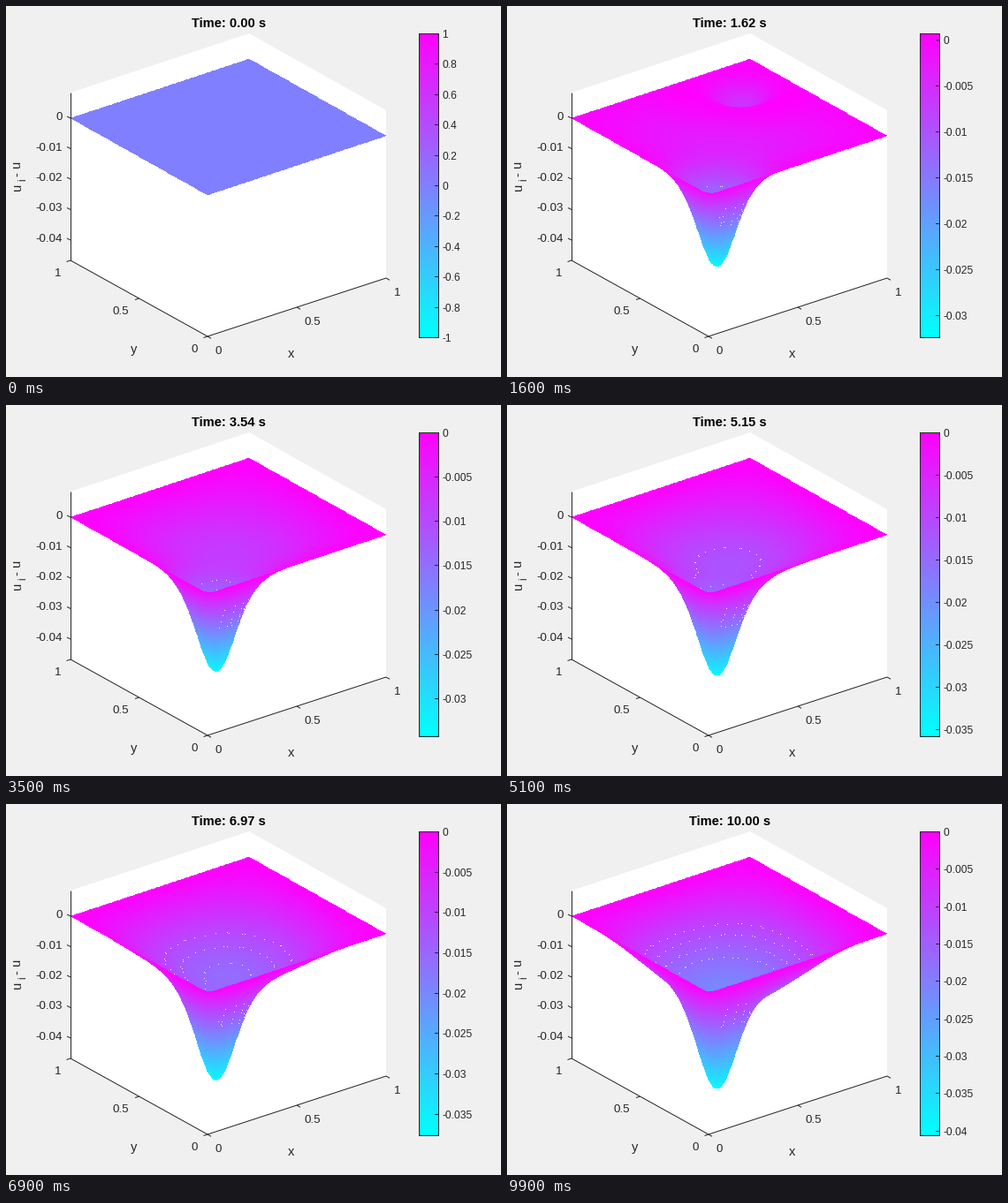
These frames come from a looping animation (560 by 420 pixels, 10000 ms). A matplotlib script:

```python
import numpy as np
import matplotlib.pyplot as plt
from matplotlib.animation import FuncAnimation

W, H, DPI = 560, 420, 100
FRAMES, INTERVAL = 100, 100
DARK = "#262626"
ORIGIN = np.array([228, 214])
EX, EY, EZ = np.array([202, -67]), np.array([-155, -87]), 3450
Z_LOW, Z_HIGH = -0.0465, 0.0084
N, LINE_STEP = 160, 8

fig = plt.figure(figsize=(W / DPI, H / DPI), dpi=DPI, facecolor="#f0f0f0")
ax = fig.add_axes([0, 0, 1, 1])
ax.set_xlim(0, W)
ax.set_ylim(H, 0)
ax.axis("off")

# descending coordinates, so that cells are painted from back to front
side = np.linspace(1, 0, N + 1)
gx, gy = np.meshgrid(side, side)


def project(x, y, z):
    px = ORIGIN[0] + EX[0] * x + EY[0] * y
    py = ORIGIN[1] + EX[1] * x + EY[1] * y - EZ * z
    return px, py


def well(x, y, var):
    """Gaussian at (0.2, 0.2) that vanishes on the near edges."""
    def part(s):
        return np.exp(-(s - 0.2) ** 2 / (2 * var)) - np.exp(-(s + 0.2) ** 2 / (2 * var))
    return part(x) * part(y)


def depth(x, y, t):
    pull = 0.031 * (1 - np.exp(-1.2 * t) * np.cos(4.85 * t))
    d = pull * (0.55 * well(x, y, 0.005) + 0.45 * well(x, y, 0.0135))
    d = d + 0.00225 * t * np.sin(np.pi * x ** 0.93) * np.sin(np.pi * y ** 0.93)
    # short-lived ripple near the far corner
    q = ((x - 0.8) ** 2 + (y - 0.8) ** 2) / 0.15 ** 2
    window = (1 - (2 * x - 1) ** 4) * (1 - (2 * y - 1) ** 4)
    swing = -0.0113 * t * np.exp(-(t / 1.6) ** 2) * np.sin(np.pi * t / 1.15)
    return d + swing * window * (1 - q) * np.exp(-q / 2)


def speckles(d, t):
    """Bright pixels where mesh lines cross a few depth levels."""
    band = np.clip(np.floor((d - 0.0105) / 0.0022), -1, 3)
    hit = np.zeros(d.shape, bool)
    hit[::LINE_STEP, 1:] |= np.diff(band, axis=1)[::LINE_STEP] != 0
    hit[1:, ::LINE_STEP] |= np.diff(band, axis=0)[:, ::LINE_STEP] != 0
    x, y = gx[hit], gy[hit]
    if not x.size:
        return np.empty((0, 2))
    px, py = project(x, y, -d[hit])
    reach = np.minimum(y, x / 0.767)
    v = np.linspace(0.04, 1, 40)[:, None] * reach
    xs, ys = np.maximum(x - 0.767 * v, 0), np.maximum(y - v, 0)
    front = project(xs, ys, -depth(xs, ys, t))[1] - py
    inside = (front > -0.3).all(axis=0)
    wall = (front < 0.3).all(axis=0) & (px > 239) & (px < 276)
    keep = inside | wall
    return np.column_stack([px[keep], py[keep]])


def label(x, y, s, px=13.33, ha="center", va="center_baseline", **kw):
    kw.setdefault("color", DARK)
    return ax.text(x, y, s, fontsize=px * 72 / DPI, family="Liberation Sans",
                   ha=ha, va=va, **kw)


def line(xs, ys, z=4):
    ax.plot(xs, ys, color=DARK, lw=0.72, zorder=z, solid_capstyle="butt")


def draw_box():
    ax.fill([73, 275, 430, 430, 228, 73], [98, 31, 118, 308, 374, 288],
            color="white", lw=0, zorder=0)
    line([73, 73], [98, 288])
    line([73, 228, 430], [288, 374, 308])
    for i, s in enumerate(("0", "0.5", "1")):
        f = i / 2
        x, y = 228 + 202 * f, 374 - 66 * f
        line([x, x + 4], [y, y + 2.3])
        label((240, 347, 443)[i], (390, 356.5, 323.5)[i], s)
        x, y = 228 - 155 * f, 374 - 86 * f
        line([x, x - 4.5], [y, y + 1.5])
        label((213.5, 130, 58.5)[i], (387.5, 344.5, 301.5)[i], s)
    for i in range(5):
        y = 127 + 34.5 * i
        line([73, 69], [y, y - 2])
        label(64, y - 2.5, f"{-0.01 * i:g}" if i else "0", ha="right")
    label(323, 393, "x", 14.67)
    label(145, 388, "y", 14.67)
    label(13, 205, "u", 14.67, va="center", rotation=90)
    label(19, 197, "i", 11.7, va="center", rotation=90)
    label(13, 184, "- u", 14.67, va="center", rotation=90)


def draw_bar():
    ax.pcolormesh([467, 489], np.linspace(375, 31, 257),
                  np.arange(256)[:, None], cmap="cool", zorder=2)
    line([467, 489, 489, 467, 467], [31, 31, 375, 375, 31])


def nice_step(span):
    for power in range(-5, 1):
        for m in (1, 2, 5):
            step = m * 10.0 ** power
            if span / step <= 11:
                return step
    return 1.0


draw_box()
draw_bar()
title = label(252, 18, "", 14.67, weight="bold")
title.set_color("black")
dots, = ax.plot([], [], ",", color="#f4f0ff", zorder=3)
moving = []


def update(frame):
    t = 10 * frame / (FRAMES - 1)
    while moving:
        moving.pop().remove()
    d = depth(gx, gy, t)
    z = -d
    lo, hi = (z.min(), max(z.max(), 0)) if frame else (-1, 1)
    if hi < 1e-5:
        hi = 0
    cells = (z[1:, 1:] + z[:-1, 1:] + z[1:, :-1] + z[:-1, :-1]) / 4
    px, py = project(gx, gy, z)
    moving.append(ax.pcolormesh(px, py, cells, cmap="cool", vmin=lo, vmax=hi,
                                zorder=2))
    step = nice_step(hi - lo)
    for k in range(int(np.ceil(lo / step - 1e-6)), int(np.floor(hi / step + 1e-6)) + 1):
        y = 375 - 344 * (k * step - lo) / (hi - lo)
        tick, = ax.plot([485, 489], [y, y], color=DARK, lw=0.72, zorder=5)
        moving.append(tick)
        moving.append(label(493, y + 0.5, f"{k * step:.6g}", 12, ha="left"))
    points = speckles(d, t)
    dots.set_data(points[:, 0], points[:, 1])
    title.set_text(f"Time: {t:.2f} s")
    return [dots, title, *moving]


anim = FuncAnimation(fig, update, frames=FRAMES, interval=INTERVAL,
                     repeat=True, repeat_delay=0, blit=False)
plt.show()
```
